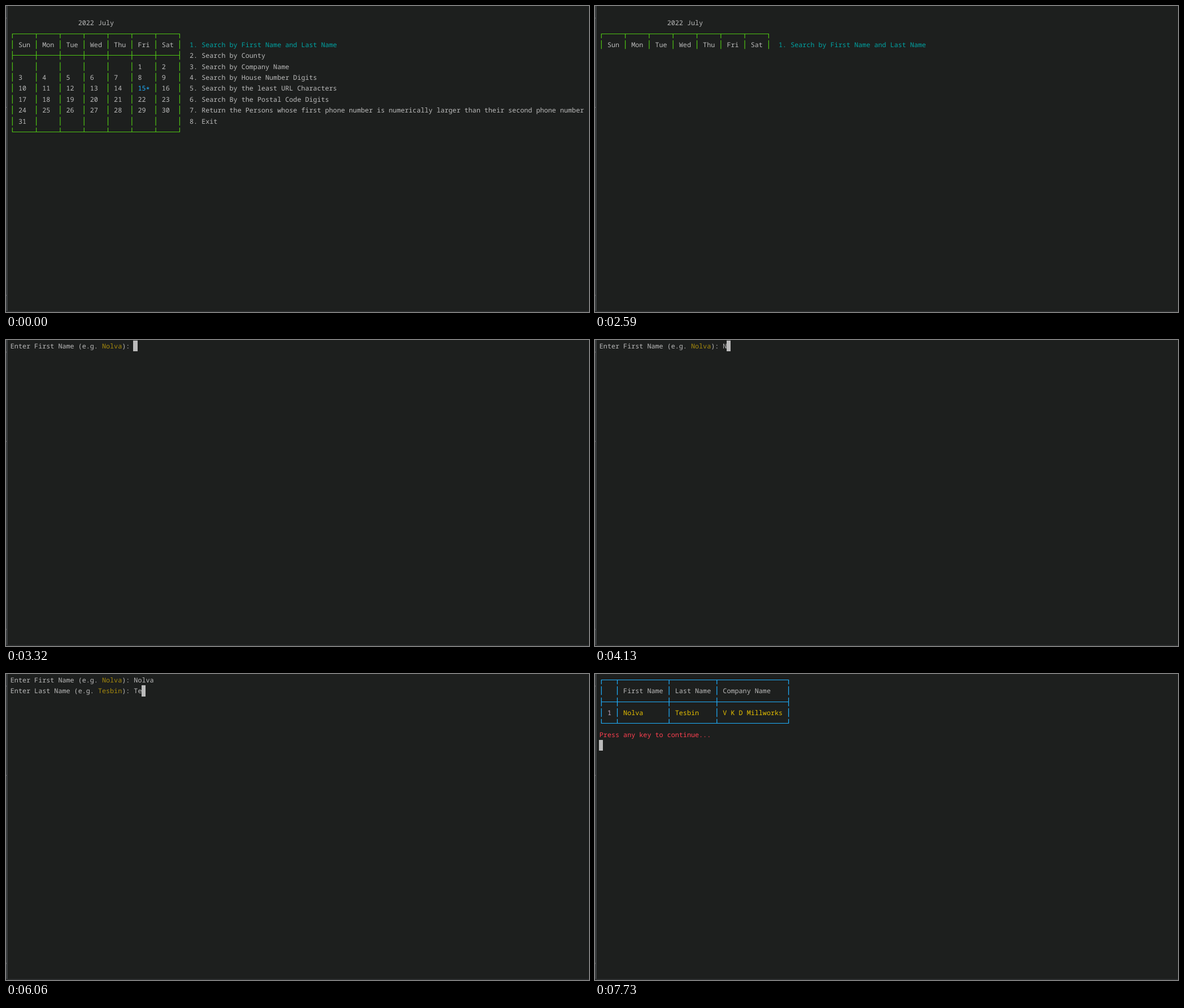
These frames come from a looping animation (1032 px wide and 543 px high, 8 s). An HTML page:

```html
<!DOCTYPE html>
<html lang="en">
<head>
<meta charset="utf-8">
<title>Terminal search</title>
<style>
  html, body { margin: 0; width: 100%; height: 100%; overflow: hidden; background: #1d1f1e; }
  svg { display: block; }
  text {
    font: 11.75px "Noto Sans Mono", "DejaVu Sans Mono", monospace;
    text-rendering: geometricPrecision;
    white-space: pre;
  }
</style>
</head>
<body>
<svg width="1032" height="543" viewBox="0 0 1032 543">
  <rect width="1032" height="543" fill="#1d1f1e"/>
  <rect y="541" width="1032" height="2" fill="#2b2d2e"/>
  <rect width="3" height="541" fill="#3c3f41"/>
  <path d="M0 21.5h1M0 180h1M0 513.5h1" stroke="#6b6d6e" stroke-width="2"/>
  <g id="screen"></g>
</svg>
<script>
const LOOP = 8000;
const CELL = 7.05, LINE = 19.35, LEFT = 7.4, TOP = 1;
const INK = 0.4; // glyphs sit slightly right of their cell edge
const GREY = '#bbbbbb', CYAN = '#00a3a3', GREEN = '#4fc414', BLUE = '#1fb0ff',
      OLIVE = '#a68a0d', YELLOW = '#e5bf00', RED = '#ff4050', PINK = '#c8aec8';

const FIRST = 'Nolva', LAST = 'Tesbin', COMPANY = 'V K D Millworks';
const FIRST_KEYS = [4130, 4330, 4530, 4730, 4850];
const LAST_KEYS = [5790, 6060, 6250, 6660, 7130, 7330];

const MENU = [
  'Search by First Name and Last Name',
  'Search by County',
  'Search by Company Name',
  'Search by House Number Digits',
  'Search by the least URL Characters',
  'Search By the Postal Code Digits',
  'Return the Persons whose first phone number is numerically larger than their second phone number',
  'Exit'
];

const colX = col => LEFT + col * CELL;
const rowY = row => Math.round(TOP + row * LINE);

const text = (col, row, value, fill = GREY) =>
  `<text x="${(colX(col) + INK).toFixed(2)}" y="${rowY(row) + 14}" fill="${fill}">${value}</text>`;

function cursor(col, row) {
  const x = Math.floor(colX(col)), y = rowY(row);
  return `<rect x="${x}" y="${y}" width="${Math.floor(colX(col + 1)) - x}" height="${rowY(row + 1) - y}" fill="${GREY}"/>`;
}

// Box-drawing glyphs are shorter than a line, so the verticals show gaps.
function grid(cols, top, rules, bottom, stroke, lastRow = bottom) {
  const x = cols.map(col => colX(col + 0.5) + INK);
  const half = 7.75;
  let d = '';
  for (let row = top; row <= Math.min(bottom, lastRow); row++) {
    const mid = rowY(row) + 9.5;
    if (rules.includes(row)) d += `M${x[0] - 0.6} ${mid}H${x[x.length - 1] + 0.6}`;
    const from = row === top ? mid : mid - half;
    const to = row === bottom ? mid : mid + half;
    for (const px of x) d += `M${px} ${from}V${to}`;
  }
  return `<path d="${d}" fill="none" stroke="${stroke}" stroke-width="1.2"/>`;
}

function menuScreen(selected, lastRow = 11) {
  let out = text(17, 1, '2022 July');
  out += grid([0, 6, 12, 18, 24, 30, 36, 42], 2, [2, 4, 11], 11, GREEN, lastRow);
  ['Sun', 'Mon', 'Tue', 'Wed', 'Thu', 'Fri', 'Sat'].forEach((day, i) => {
    out += text(2 + i * 6, 3, day);
  });
  for (let day = 1; day <= 31; day++) {
    const slot = day + 4, row = 5 + Math.floor(slot / 7);
    if (row > lastRow) break;
    const col = 2 + slot % 7 * 6;
    out += day === 15 ? text(col, row, '15<tspan dy="2">*</tspan>', BLUE) : text(col, row, day);
  }
  MENU.forEach((label, i) => {
    if (3 + i <= lastRow) out += text(45, 3 + i, `${i + 1}. ${label}`, i === selected ? CYAN : GREY);
  });
  return out;
}

function prompt(row, kind, sample, typed) {
  const lead = `Enter ${kind} Name (e.g. `;
  const end = lead.length + sample.length;
  return text(0, row, lead) + text(lead.length, row, sample, OLIVE) +
    text(end, row, '):') + text(end + 3, row, typed);
}

const typedAt = (word, keys, t) => word.slice(0, keys.filter(k => k <= t).length);

function promptScreen(t) {
  const first = typedAt(FIRST, FIRST_KEYS, t);
  const out = prompt(0, 'First', FIRST, first);
  if (t < 5000) {
    const blinkedOff = t >= 3850 && t < 4130;
    return out + (blinkedOff ? '' : cursor(31 + first.length, 0));
  }
  const last = typedAt(LAST, LAST_KEYS, t);
  return out + prompt(1, 'Last', LAST, last) + cursor(31 + last.length, 1);
}

function resultScreen(done) {
  const out = grid([0, 4, 17, 29, 47], 0, [0, 2, 4], 4, BLUE) +
    text(6, 1, 'First Name') + text(19, 1, 'Last Name') + text(31, 1, 'Company Name') +
    text(2, 3, '1', PINK) + text(6, 3, FIRST, YELLOW) +
    text(19, 3, LAST, YELLOW) + text(31, 3, COMPANY, YELLOW);
  return done ? out + text(0, 5, 'Press any key to continue...', RED) + cursor(0, 6) : out;
}

function render(t) {
  if (t < 2120) {
    const pointer = t >= 200 && t < 270 ? '<path d="M1030 523l2 2v7l-2 2z" fill="#ccc"/>' : '';
    return menuScreen(0) + pointer;
  }
  if (t < 2590) return menuScreen(1);
  if (t < 2660) return menuScreen(0, 3);
  if (t < 3320) return menuScreen(0);
  if (t < 7680) return promptScreen(t);
  return resultScreen(t >= 7730);
}

const screenNode = document.getElementById('screen');
const start = performance.now();
let shown = '';

function tick() {
  const markup = render((performance.now() - start) % LOOP);
  if (markup !== shown) screenNode.innerHTML = shown = markup;
  requestAnimationFrame(tick);
}
tick();
</script>
</body>
</html>
```
